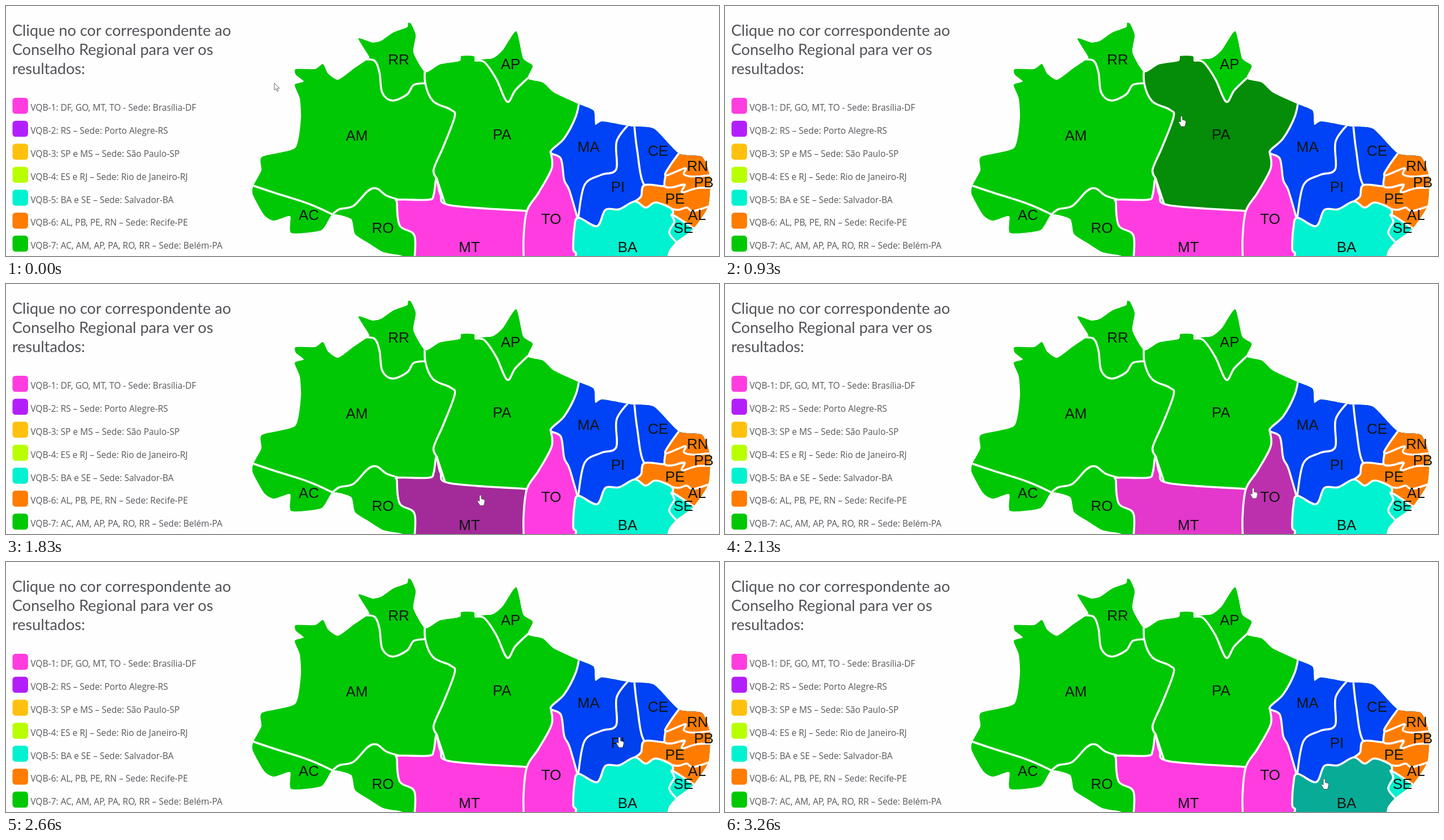
Write an HTML page that moves like this. It is 1262 by 444 pixels and loops after 3.3 s.

```html
<!DOCTYPE html>
<html lang="pt">
<head>
<meta charset="utf-8">
<title>Conselhos Regionais</title>
<style>
html, body { margin: 0; width: 100%; height: 100%; overflow: hidden; background: #fefefe; }
svg { display: block; width: 100vw; height: 100vh; }
.title { font: 27.1px Lato, "Open Sans", sans-serif; fill: #505257; }
.legend { font: 15.5px "Open Sans", "Noto Sans", sans-serif; fill: #55575b; }
.label { font: 26px "Liberation Sans", Arial, sans-serif; fill: #101510; text-anchor: middle; }
.state { stroke: #fefefe; stroke-width: 3.6; stroke-linejoin: round; }
.cursor { fill: #fff; stroke: #444; stroke-width: .8; stroke-linejoin: round; }
</style>
</head>
<body>
<svg id="stage" viewBox="0 0 1262 444" preserveAspectRatio="none"></svg>
<script>
const LOOP = 3300, FADE = 100;
const stage = document.getElementById('stage');

function add(tag, attrs, text, parent = stage) {
  const el = document.createElementNS('http://www.w3.org/2000/svg', tag);
  for (const k in attrs) el.setAttribute(k, attrs[k]);
  if (text) el.textContent = text;
  return parent.appendChild(el);
}

// Cardinal spline through key points; pull sets how round the corners are.
function spline(text, pull) {
  const pts = text.split(' ').map(p => p.split(',').map(Number));
  const handle = (i, sign) => {
    const a = pts[Math.max(i - 1, 0)], c = pts[Math.min(i + 1, pts.length - 1)];
    return pts[i].map((v, k) => (v + sign * (c[k] - a[k]) * pull / 3).toFixed(1));
  };
  return 'M' + pts[0] + pts.slice(1).map((p, i) => `C${handle(i, 1)} ${handle(i + 1, -1)} ${p}`).join('');
}

const coast = '725,455 700,443 668,437 642,421 618,405 611,378 578,370 558,398 505,403 503,373 474,381 457,371 '
  + '437,335 438,319 452,292 453,268 512,252 522,200 520,164 511,140 527,134 513,122 513,112 547,112 561,103 '
  + '570,120 588,131 616,111 638,96 643,90 624,58 648,65 664,62 686,47 710,38 712,30 717,32 725,52 721,83 '
  + '742,118 768,104 803,98 806,89 827,89 834,95 862,93 880,78 903,45 915,93 932,106 923,129 950,136 '
  + '970,154 1013,174 1040,186 1043,211 1056,205 1107,214 1147,218 1191,262 1232,268 1246,305 1243,355 '
  + '1217,395 1187,418 1173,435 1169,455';

// Base and hover colours.
const pink = [[255, 60, 223], [162, 43, 153]];
const green = [[0, 200, 4], [5, 140, 9]];
const blue = [[0, 66, 245], [3, 47, 174]];
const teal = [[0, 242, 208], [7, 171, 150]];
const orange = [[255, 124, 0], [180, 88, 0]];
const rgb = c => `rgb(${c.map(Math.round)})`;

// Name, colours, label centre, visible border, corners closing the shape.
// Each state covers part of the earlier ones; the coast clips them all.
const states = [
  ['AM', green, 621, 230, '400,0 1262,0', '1262,470 400,470'],
  ['RR', green, 695, 95, '632,95 652,97 661,118 666,154 684,168 710,157 722,140 745,137', '760,20 600,20'],
  ['PA', green, 878, 228, '742,100 742,137 756,169 787,184 794,197 774,250 757,290 762,306', '800,420 1000,420 1100,60 742,60'],
  ['AC', green, 536, 371, '420,313 470,330 535,351 578,370', '578,420 420,420'],
  ['RO', green, 667, 394, '577,371 590,361 615,355 640,329 656,324 674,337 700,345', '760,460 578,460'],
  ['AP', green, 893, 103, '831,97 847,100 868,130 887,170 902,149 928,124', '960,110 960,30 831,30'],
  ['MT', pink, 820, 428, '722,460 723,408 697,390 692,350 695,344 748,344 757,335 762,306 769,335 787,354 922,364', '960,460'],
  ['TO', pink, 965, 378, '917,460 916,415 922,364 943,331 966,288 964,259', '1030,270 1030,460'],
  ['MA', blue, 1031, 250, '1016,160 1009,195 988,235 964,259 982,271 988,309 997,327 1011,375', '1060,400 1120,300 1130,160'],
  ['PI', blue, 1083, 321, '1107,205 1081,240 1080,290 1053,300 1024,318 1013,375', '1013,420 1140,420 1140,200'],
  ['CE', blue, 1154, 257, '1111,200 1117,255 1130,318 1166,320', '1250,320 1250,200'],
  ['PE', orange, 1184, 342, '1200,318 1166,320 1130,318 1124,338 1113,347', '1113,400 1290,400 1290,318'],
  ['PB', orange, 1235, 313, '1290,324 1228,323 1197,331 1201,317 1180,322 1166,320 1167,302', '1185,285 1290,285'],
  ['RN', orange, 1224, 284, '1196,255 1175,284 1168,301 1202,288 1200,299 1218,303 1260,299', '1290,240'],
  ['AL', orange, 1223, 371, '1172,359 1190,362 1205,358 1217,364 1255,352', '1290,420 1178,420'],
  ['BA', teal, 1100, 428, '1002,460 1009,440 1004,432 1006,395 1013,376 1046,391 1061,362 1085,361 1113,347 1132,358 1150,349 1178,360 1180,371', '1200,460'],
  ['SE', teal, 1199, 394, '1189,422 1174,403 1183,383 1180,371 1225,400', '1225,440']
];

add('path', { d: spline(coast, .3) + 'Z' }, '', add('clipPath', { id: 'land' }));
const map = add('g', { 'clip-path': 'url(#land)' });
const shapes = {};
for (const [name, colors, , , border, corners] of states) {
  const d = `${spline(border, .5)}L${corners}Z`;
  shapes[name] = { colors, el: add('path', { class: 'state', d, fill: rgb(colors[0]) }, '', map) };
}
for (const [name, , x, y] of states) add('text', { class: 'label', x, y: y + 8.7 }, name);

['Clique no cor correspondente ao', 'Conselho Regional para ver os', 'resultados:']
  .forEach((line, i) => add('text', { class: 'title', x: 11, y: 53 + 34.2 * i }, line));

[
  [rgb(pink[0]), 'DF, GO, MT, TO - Sede: Brasília-DF'],
  ['#b31ffc', 'RS – Sede: Porto Alegre-RS'],
  ['#ffc10e', 'SP e MS – Sede: São Paulo-SP'],
  ['#b8ff03', 'ES e RJ – Sede: Rio de Janeiro-RJ'],
  [rgb(teal[0]), 'BA e SE – Sede: Salvador-BA'],
  [rgb(orange[0]), 'AL, PB, PE, RN – Sede: Recife-PE'],
  [rgb(green[0]), 'AC, AM, AP, PA, RO, RR – Sede: Belém-PA']
].forEach(([fill, text], i) => {
  const y = 163 + 40.8 * i;
  add('rect', { x: 11.5, y, width: 27.5, height: 28.5, rx: 5.5, fill });
  add('text', { class: 'legend', x: 43.5, y: y + 23.3 }, `VQB-${i + 1}: ${text}`);
});

const arrow = add('path', { class: 'cursor', d: 'M0 0V12.5L2.9 9.8 5 14.6 7 13.7 5 9.1H9Z' });
const hand = add('path', { class: 'cursor',
  d: 'M-2 1.6a1.7 1.7 0 0 1 3.4 0V6.5l4.4 1.2q1.9.6 1.7 2.8L6.6 15 5.5 18.5H-1L-5.2 11.6q-.8-1.9 1-2.1L-2 10.8Z' });

// Pointer trips: start time, end time, destination, downward bend.
const home = [475, 137];
const moves = [
  [30, 200, [654, 135], 0],
  [640, 960, [812, 197], 0],
  [1430, 1610, [840, 375], 0],
  [1900, 2345, [1020, 291], 32],
  [2530, 2650, [1086, 311], 0],
  [2930, 3130, [1061, 385], 0]
];

// State, hover start, hover end.
const hovers = [
  ['AM', 90, 830], ['PA', 830, 1550], ['MT', 1550, 2060], ['TO', 2060, 2180],
  ['MA', 2180, 2550], ['PI', 2650, 3020], ['BA', 3020, LOOP]
];

const clamp = v => Math.min(1, Math.max(0, v));

function pointer(t) {
  let [x, y] = home;
  for (const [from, to, end, bend] of moves) {
    const u = clamp((t - from) / (to - from)), e = u * u * (3 - 2 * u);
    x += (end[0] - x) * e;
    y += (end[1] - y) * e + bend * Math.sin(Math.PI * e);
  }
  return `${x.toFixed(2)} ${y.toFixed(2)}`;
}

function draw(t) {
  for (const [name, on, off] of hovers) {
    const { colors: [base, dark], el } = shapes[name];
    const mix = clamp((t - on) / FADE) - clamp((t - off) / FADE);
    el.setAttribute('fill', rgb(base.map((v, i) => v + (dark[i] - v) * mix)));
  }
  const over = t >= hovers[0][1];
  const at = `translate(${pointer(t)})`;
  for (const [el, shown] of [[arrow, !over], [hand, over]]) {
    el.setAttribute('transform', at);
    el.setAttribute('visibility', shown ? 'visible' : 'hidden');
  }
}

const start = performance.now();
function tick() {
  draw((performance.now() - start) % LOOP);
  requestAnimationFrame(tick);
}
tick();
</script>
</body>
</html>
```
